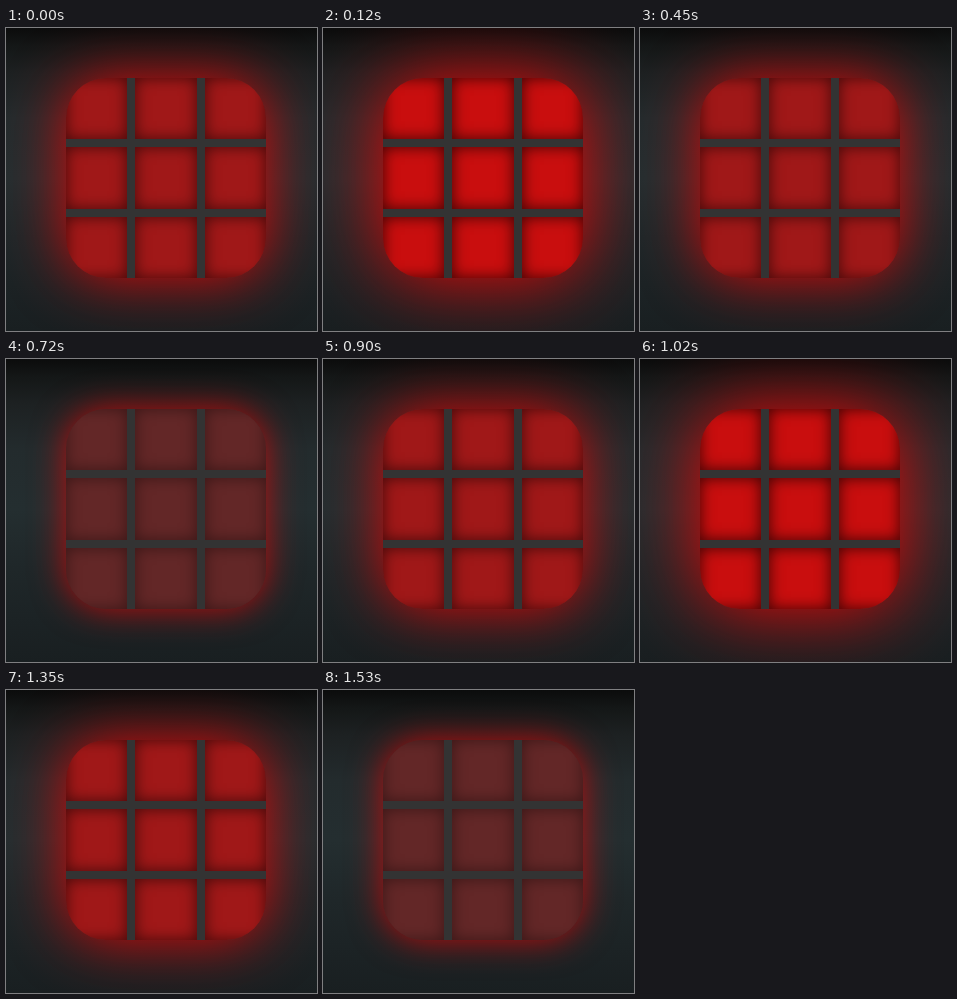
An HTML page that plays this animation: 311x303 px, repeating every 1.56 s.

```html
<!DOCTYPE html>
<html lang="en">
<head>
<meta charset="utf-8">
<title>Pulsing grid</title>
<style>
  html, body {
    margin: 0;
    width: 100%;
    height: 100%;
    overflow: hidden;
  }
  body {
    position: relative;
    background: linear-gradient(#0b0c0c 0, #141717 18px, #1d2122 45px, #232b2d 90px, #242e30 150px, #1f2729 210px, #191f21 303px);
  }
  #panel {
    position: absolute;
    left: 60px;
    top: 50px;
    width: 200px;
    height: 200px;
    display: grid;
    grid-template: repeat(3, 1fr) / repeat(3, 1fr);
    gap: 8px;
    overflow: hidden;
    border-radius: 40px;
    background: #333;
  }
</style>
</head>
<body>
<div id="panel"></div>
<script>
const LOOP = 1560, STEP = 30, PERIOD = 900;
const DIM = 0.16, BRIGHT = 0.91;

const panel = document.getElementById('panel');
const cells = Array.from({ length: 9 }, () => panel.appendChild(document.createElement('div')));

// Linear pulse between DIM and BRIGHT, starting halfway up.
function levelAt(time) {
  const phase = (time / PERIOD + 0.25) % 1;
  const rise = 1 - Math.abs(2 * phase - 1);
  return DIM + (BRIGHT - DIM) * rise;
}

function render(time) {
  const level = levelAt(time);
  const blur = 15 + 82 * level;
  const glow = Math.min(1, 0.6 + 0.45 * level);
  const shade = 0.3 + 0.55 * level;
  panel.style.boxShadow = `0 0 ${blur}px rgba(255, 0, 0, ${glow})`;
  for (const cell of cells) {
    cell.style.backgroundColor = `rgba(255, 0, 0, ${level})`;
    cell.style.boxShadow = `inset 0 0 15px rgba(0, 0, 0, ${shade})`;
  }
}

const start = performance.now();
function tick() {
  const time = (performance.now() - start) % LOOP;
  render(Math.floor(time / STEP) * STEP);
  requestAnimationFrame(tick);
}
tick();
</script>
</body>
</html>
```
